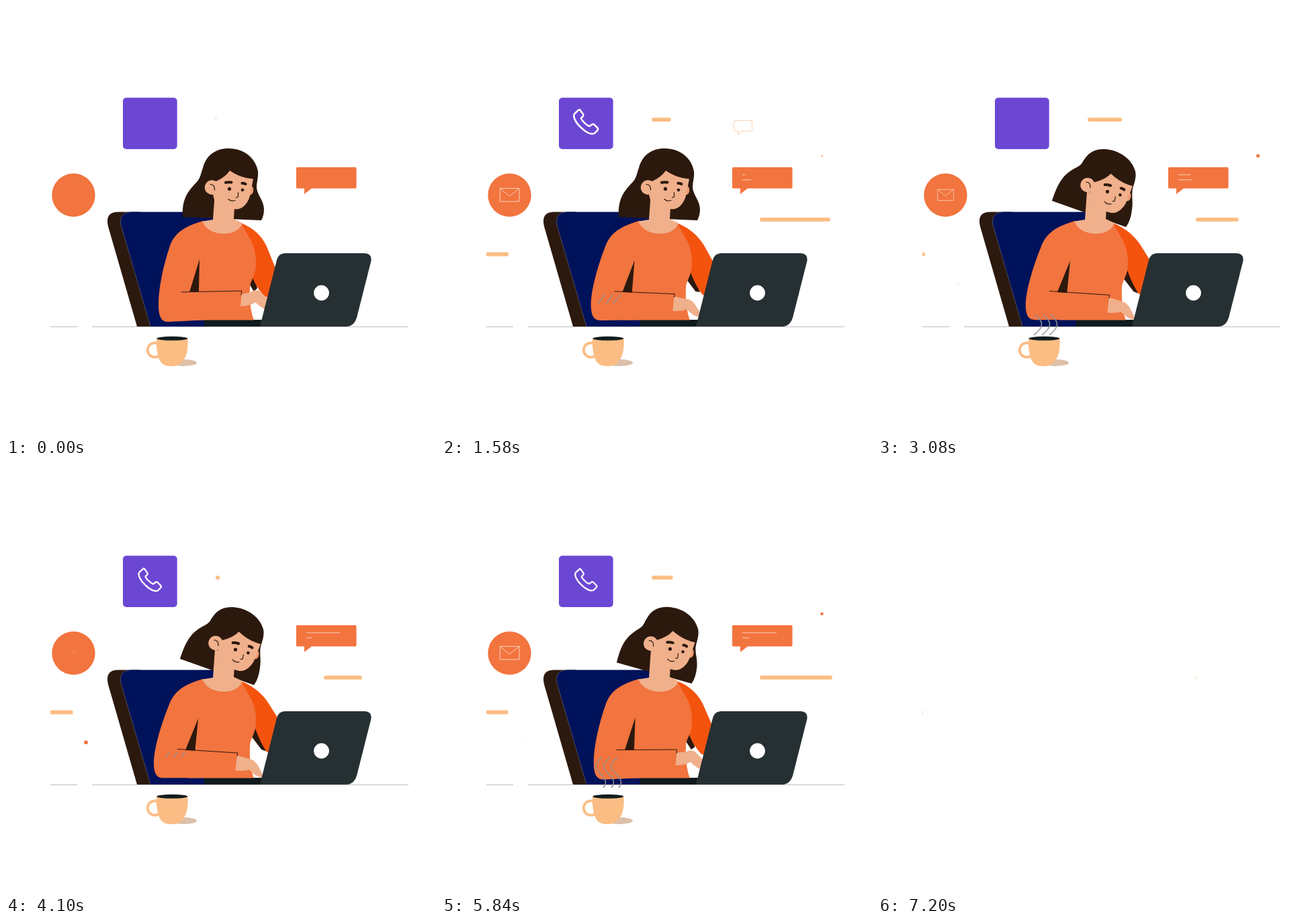
An HTML page for the animation above (7.22 s loop, 640 px wide and 640 px high).

```html
<!DOCTYPE html>
<html lang="en">
<head>
<meta charset="utf-8">
<title>Working at a laptop</title>
<style>
html, body { margin: 0; width: 100%; height: 100%; overflow: hidden; background: #fff }
svg { display: block; width: 100vw; height: 100vh }
.line { fill: none; stroke: #2c190e; stroke-linecap: round }
</style>
</head>
<body>
<svg viewBox="0 0 640 640">
  <g id="scene">
    <path d="M66 477.5H106M128 477.5H599" stroke="#bdbdbd"/>

    <rect x="174" y="136.5" width="80.700" height="76.5" rx="5" fill="#6c47d3"/>
    <path id="phone" fill="none" stroke="#fff" stroke-width="2.5" stroke-linejoin="round"
      d="M203.5 154.5L197.5 160C194 164 199 174 207 181C214 188 222 192 227 189.5L231.5 185Q233 183 231.5 181.5L226.5 176.5Q224.5 175 223 176.5L219.5 179C216 178 208 171 207 167L210 164Q211 162.5 210 161L206 155.5Q204.5 153.5 203.5 154.5Z"/>

    <circle cx="100.5" cy="281.5" r="32.2" fill="#f2743e"/>
    <path id="mail" fill="none" stroke="#fbd3c0" d="M86.3 271.5H115V291H86.3ZL100.5 283L115 271.5"/>

    <rect x="432" y="240" width="89.5" height="31.5" rx="1.5" fill="#f2743e"/>
    <path d="M444 271V280L455.5 271Z" fill="#f2743e"/>
    <g fill="#f9c3a6">
      <rect id="text1" x="447" y="250.5" height="1.2"/>
      <rect id="text2" x="447" y="258" height="1.2"/>
    </g>
    <path id="chat" fill="none" stroke="#fad0ae" d="M436 170.5H460Q461.5 170.5 461.5 172V184.5Q461.5 186 460 186H447L440.5 191.5V186H436Q434.5 186 434.5 184.5V172Q434.5 170.5 436 170.5Z"/>
    <rect id="bar1" x="312" y="166.2" height="5.8" rx="2.9" fill="#fbbd84"/>
    <rect id="squareR" fill="#f0703a" rx=".8"/>
    <rect id="squareL" fill="#f0703a" rx=".8"/>

    <path d="M195 477L152 328Q147 307 166 306.5H200L216 477Z" fill="#2c190e"/>
    <path d="M215 477L171 326Q168 307 186 306.5H318V477Z" fill="#00125a"/>
    <path d="M215 477L171 326Q168 307 186 306.5" fill="none" stroke="#a39a98" stroke-width=".4"/>

    <path id="gapR" fill="#2c190e"/>
    <path id="armR" fill="#f4530e"/>
    <path d="M295 467H382V477H295Z" fill="#0f1a1c"/>
    <path d="M293 320L350 323L365 350C373 365 373 385 371 394C368 406 363 411 363 420C362 440 365 458 369 467.5H270V335Z" fill="#f2743e"/>
    <path id="armL" fill="#f2743e"/>
    <path id="gapL" fill="#2c190e"/>
    <path id="hand" fill="#f0b08c"/>
    <path id="fold" class="line" stroke-width="1"/>

    <path id="hair" fill="#2c190e"/>
    <path d="M311 276L308 318L292 320.5Q301 339 325 339Q346 338 352 323L339 317L341 285Z" fill="#f0b08c"/>
    <g id="face">
      <ellipse cx="363.5" cy="274" rx="4.8" ry="7" fill="#ee9a70"/>
      <path d="M305 264Q325 257 333 245Q349 256 368 257.5L364.5 275Q363 288 356 296Q349 304 339 302L314 300L309 285Z" fill="#f0b08c"/>
      <path class="line" stroke-width="4" d="M327 262.8Q331 261.8 335.5 262.5M351.5 263.8Q354 263.6 356.5 265"/>
      <circle cx="332.5" cy="272.2" r="2.6" fill="#2c190e"/>
      <circle cx="352" cy="273.7" r="2.3" fill="#2c190e"/>
      <path class="line" stroke-width="1.2" d="M345.5 277.5V283.5Q345 285 342.5 284.8M331 287.5Q335 291.5 341 289.3"/>
    </g>
    <g id="ear">
      <circle cx="306.5" cy="270" r="10.7" fill="#f0b08c"/>
      <path class="line" stroke-width="1.2" d="M304 265.5Q311 265.5 310.5 274"/>
    </g>

    <path d="M378 477L403 378Q406 368 415 368H534Q546 369 543 381L522 464Q518 477 507 477Z" fill="#263033"/>
    <circle cx="469.5" cy="427" r="11.4" fill="#fff"/>

    <ellipse cx="264" cy="531" rx="20" ry="5" fill="#dcc0aa"/>
    <circle cx="221.5" cy="512" r="10.7" fill="none" stroke="#fbbd84" stroke-width="3.8"/>
    <path d="M224 495H270.5Q272 520 262 530Q257 536 249 536H243Q233 535 229 528Q223 515 224 495Z" fill="#fbbd84"/>
    <ellipse cx="247.3" cy="494.8" rx="23" ry="3" fill="#101c1e"/>
    <g id="steam" fill="none" stroke="#929292" stroke-width="1.5"></g>
  </g>
  <g fill="#fbbd84">
    <rect id="bar2" x="473" y="315" height="5.8" rx="2.9"/>
    <rect id="bar3" x="66" y="366.6" height="5.8" rx="1.6"/>
  </g>
</svg>
<script>
const LOOP = 7220;
const el = id => document.getElementById(id);
const set = (id, attrs) => { for (const k in attrs) el(id).setAttribute(k, attrs[k]); };
const ease = x => (1 - Math.cos(Math.PI * Math.min(1, Math.max(0, x)))) / 2;

// Swings between 0 and 1, turning at each of the given times.
function swing(t, turns) {
  let i = 0;
  while (i < turns.length - 2 && t >= turns[i + 1]) i++;
  const k = ease((t - turns[i]) / (turns[i + 1] - turns[i]));
  return i % 2 ? 1 - k : k;
}

// Blends two paths that share the same commands.
function mix(a, b, k) {
  const to = b.match(/[\d.]+/g);
  let i = 0;
  return a.replace(/[\d.]+/g, n => (+n + (to[i++] - n) * k).toFixed(2));
}

const poses = {
  armL: ["M293 320C262 329 249 340 243 360C234 387 227 420 227 444C227 462 231 471 243 470L300 467L349 466V447L351 424L287 425L288 377L325 330Z",
         "M293 320C262 329 249 340 242 360C231 387 219 425 219.5 447C220 464 226 468 236 467L300 467L342 466V457L344 430L281 427L286 379L325 330Z"],
  gapL: ["M288 377L287 425L273 426Z", "M286 379L281 427L266.5 426Z"],
  fold: ["M261 425.8L350.8 424L350 430", "M255 424.3L344.5 430.5L343.5 435"],
  hand: ["M350.5 429L364 426Q369 421 377 424L389 435L390 453Q383 452 371 441Q365 446 349 447Z",
         "M343.5 434L363 440Q369 442 374 449L381 463L382 467Q374 469 361 456Q355 458 341 457Z"],
  armR: ["M350 323C370 331 381 343 388 358L401 390L395 436L385 432C379 426 371 416 366 402C372 390 370 366 358 342Z",
         "M350 323C371 332 383 344 391 356L407 381L398 434L388 428C381 417 376 406 371 392C373 380 370 364 358 342Z"],
  gapR: ["M368 396L361 412L369 425L374 420Z", "M371 384L364 403L381 425L388 428Z"]
};
const hair = [
  "M263 314C262 290 268 278 283 263C290 256 290 248 293 241C298 222 312 212 331 212C356 212 372 228 375 246C376 254 373 262 373 270C374 282 383 288 384 302Q384 312 380 319Z",
  "M259 290C268 262 276 250 296 240C304 236 304 232 308 227C315 217 324 213 336 213C360 214 378 228 383 246C385 256 381 264 379 272C377 282 380 290 378 303Q376 320 369 329Z"
];

el("steam").innerHTML = [0, 12, 23].map(x =>
  `<path pathLength="1" transform="translate(${x})" d="M232 490C238 484 244 480 243.5 473C243 463 229 459 228.5 450C229 443 238 438 243 428.5"/>`).join("");

function bar(id, width) {
  set(id, { width: width.toFixed(2) });
}
function square(id, x, y, size) {
  set(id, { x: x - size / 2, y: y - size / 2, width: size, height: size });
}
function zoom(id, x, y, k) {
  set(id, { transform: `translate(${x} ${y}) scale(${k}) translate(${-x} ${-y})`, visibility: k < .02 ? "hidden" : "inherit" });
}

function draw(t) {
  set("scene", { visibility: t >= 7200 ? "hidden" : "visible" });

  const typing = (1 - Math.cos(2 * Math.PI * t / 1200)) / 2;
  for (const id in poses) set(id, { d: mix(...poses[id], typing) });

  const nod = ease((t - 1620) / 1380) - ease((t - 5400) / 1400);
  set("hair", { d: mix(...hair, nod) });
  set("face", { transform: `translate(${9 * nod} ${4 * nod}) rotate(${10 * nod} 332 272)` });
  set("ear", { transform: `translate(${5.5 * nod} ${-3.5 * nod})` });

  bar("bar1", .8 + 50.5 * swing(t, [0, 1080, 2160, 3080, 4380, 5280, 6590, 7500]));
  bar("bar2", 111 * swing(t, [0, 1420, 2480, 3580, 4640, 5670, 7280]));
  bar("bar3", 37 * swing(t, [0, 370, 790, 1800, 2860, 3920, 4840, 6140, 7300]));
  bar("text1", 52 * swing(t, [0, 850, 1740, 2120, 2500, 3950, 5200, 5900, 6900]));
  bar("text2", 22 * swing(t, [0, 1150, 2150, 3220, 3750, 4560, 5500, 6220, 7200]));
  square("squareR", 565.5, 223, 9 * swing(t, [0, 600, 2000, 2150, 4000, 4900, 6660, 7500]));
  square("squareL", 119, 414.3, 11 * swing(t, [0, 700, 1540, 2150, 3320, 4940, 6050, 7200]));

  zoom("phone", 214, 172.5, ease(t / 700) - ease((t - 2200) / 750) + ease((t - 3150) / 1150) - ease((t - 5600) / 1150));
  zoom("mail", 100.5, 281.2, ease(t / 900) - ease((t - 2760) / 1200) + ease((t - 3960) / 480) - ease((t - 5900) / 1100));
  set("chat", { opacity: ease((t - 900) / 500) - ease((t - 1800) / 600) });

  const phase = t % 2400 / 2400;
  const head = ease(phase / .56), tail = ease((phase - .3) / .53);
  for (const p of el("steam").children) {
    p.setAttribute("stroke-dasharray", `0 ${tail} ${head - tail} 2`);
    p.setAttribute("visibility", head - tail < .005 ? "hidden" : "inherit");
  }
}

const start = performance.now();
function tick() {
  draw((performance.now() - start) % LOOP);
  requestAnimationFrame(tick);
}
tick();
</script>
</body>
</html>
```
